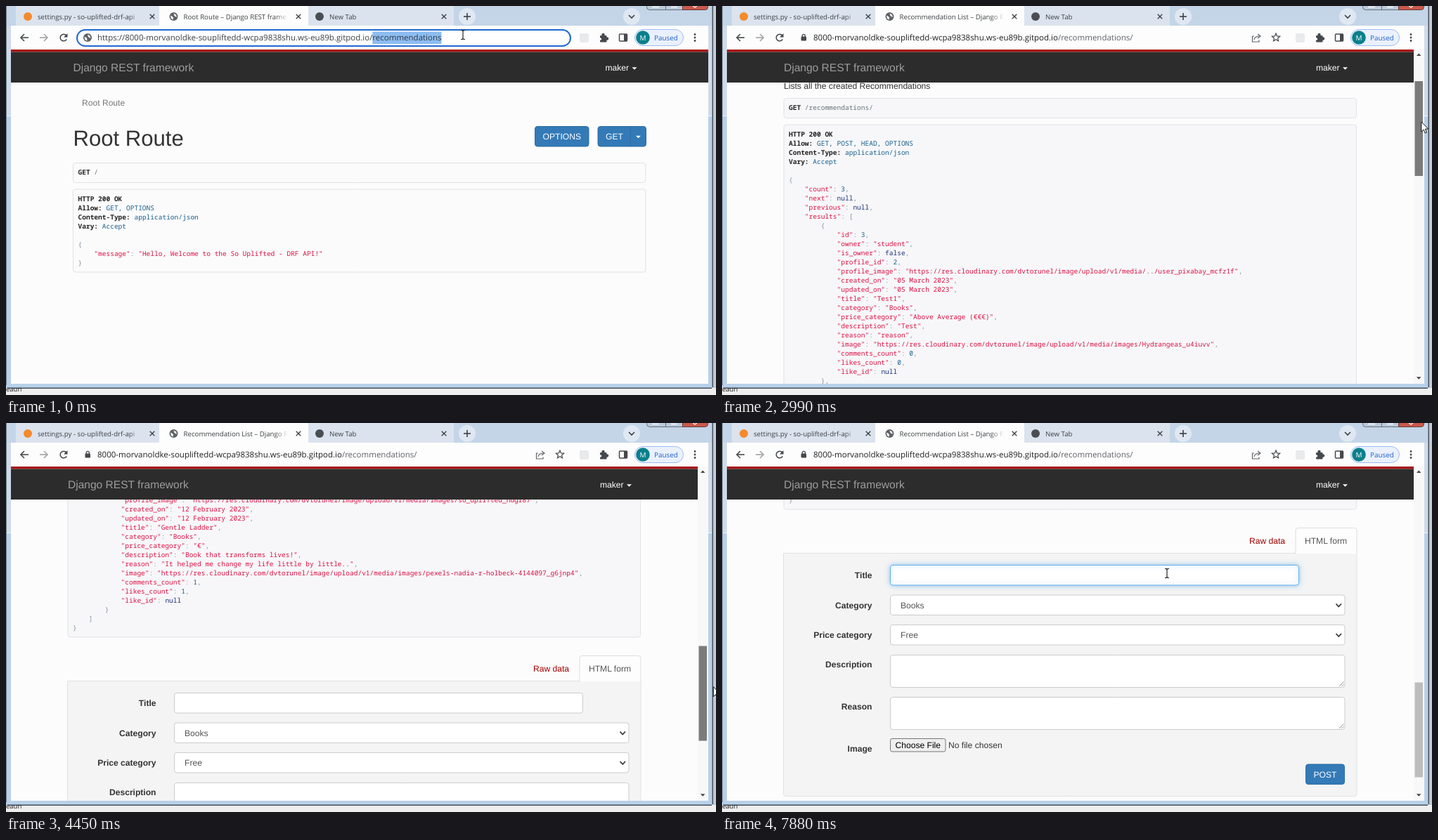
Write an HTML page with a canvas that moves like this. It is 1010 by 554 pixels and loops after 8 s.

```html
<!DOCTYPE html>
<html lang="en">
<head>
<meta charset="utf-8">
<title>Recommendation List</title>
<style>
html, body { margin: 0; width: 100%; height: 100%; overflow: hidden; background: #eee; }
canvas { display: block; width: 1010px; height: 554px; }
</style>
</head>
<body>
<canvas id="stage" width="1010" height="554"></canvas>
<script>
const c = document.getElementById('stage').getContext('2d');
const LOOP = 8000;
const SANS = '"Liberation Sans", Arial, sans-serif';
const UI = '"Open Sans", "Noto Sans", sans-serif';
const MONO = '"Noto Sans Mono", "DejaVu Sans Mono", monospace';
const BODY = '12.1px ' + SANS;
const BOLD = 'bold ' + BODY;
const CELL = 5.712, LINE = 13;
const END_SCROLL = 1027;

// Each move: start, end, number of steps, then the values reached
const MOUSE = [
  [0, 0, 1, 650, 41],
  [1520, 1690, 4, 917, 211],
  [1940, 2580, 12, 992, 133],
  [2760, 3200, 7, 997, 189],
  [3430, 3710, 5, 1003, 252],
  [3990, 4260, 5, 1006, 367],
  [4450, 4920, 7, 1008, 428],
  [5330, 5440, 3, 724, 279],
  [5690, 5910, 5, 633, 214],
];
const SCROLL = [
  [0, 0, 1, 0],
  [2760, 3200, 7, 190],
  [3430, 3710, 5, 410],
  [3990, 4260, 5, 815],
  [4450, 4920, 7, END_SCROLL],
];

function follow(track, t) {
  let v = track[0].slice(3);
  for (const [from, to, n, ...goal] of track) {
    if (t < from) break;
    const k = Math.min(n, 1 + Math.floor((t - from) / (to - from || 1) * (n - 1) + 1e-6));
    v = v.map((x, i) => x + (goal[i] - x) * k / n);
  }
  return v;
}

// Drawing helpers
function rect(x, y, w, h, fill) {
  c.fillStyle = fill;
  c.fillRect(x, y, w, h);
}

function box(x, y, w, h, r, fill, stroke, width = 1) {
  c.beginPath();
  c.roundRect(x, y, w, h, r);
  if (fill) { c.fillStyle = fill; c.fill(); }
  if (stroke) { c.strokeStyle = stroke; c.lineWidth = width; c.stroke(); }
}

function disc(x, y, r, fill) {
  c.beginPath();
  c.arc(x, y, r, 0, 7);
  c.fillStyle = fill;
  c.fill();
}

function text(str, x, y, font, fill, align = 'left') {
  c.font = font;
  c.fillStyle = fill;
  c.textAlign = align;
  c.fillText(str, x, y);
}

function line(color, width, ...pts) {
  c.beginPath();
  for (let i = 0; i < pts.length; i += 2) c.lineTo(pts[i], pts[i + 1]);
  c.strokeStyle = color;
  c.lineWidth = width;
  c.stroke();
}

function shape(fill, ...pts) {
  c.beginPath();
  for (let i = 0; i < pts.length; i += 2) c.lineTo(pts[i], pts[i + 1]);
  c.closePath();
  c.fillStyle = fill;
  c.fill();
}

const caretDown = (x, y, fill, r = 3.5) => shape(fill, x - r, y - r / 2, x + r, y - r / 2, x, y + r / 2);

// Response text
const MEDIA = 'https://res.cloudinary.com/dvtorunel/image/upload/v1/media/';

function record(id, owner, mine, profile, photo, date, title, category, price, about, reason, image, count) {
  const day = date + ' 2023';
  return {
    id, owner, is_owner: mine, profile_id: profile, profile_image: MEDIA + photo,
    created_on: day, updated_on: day, title, category, price_category: price,
    description: about, reason, image: MEDIA + 'images/' + image,
    comments_count: count, likes_count: count, like_id: null,
  };
}

const USER_PHOTO = '../user_pixabay_mcfz1f';
const LIST = {
  count: 3, next: null, previous: null,
  results: [
    record(3, 'student', false, 2, USER_PHOTO, '05 March', 'Test1', 'Books',
      'Above Average (€€€)', 'Test', 'reason', 'Hydrangeas_u4iuvv', 0),
    record(2, 'student', false, 2, USER_PHOTO, '13 February', 'A quiet harbor', 'Music',
      'Free', 'Song that lifts the mood', 'It keeps me going', 'Tulips_k2dmwq', 1),
    record(1, 'maker', true, 1, 'images/so_uplifted_hdgr87', '12 February', 'Gentle Ladder', 'Books',
      '€', 'Book that transforms lives!', 'It helped me change my life little by little..',
      'pexels-nadia-r-holbeck-4144097_g6jnp4', 1),
  ],
};
const ROOT = { message: 'Hello, Welcome to the So Uplifted - DRF API!' };
const toLines = data => JSON.stringify(data, null, 4).split('\n');
const LIST_LINES = toLines(LIST), ROOT_LINES = toLines(ROOT);

const code = (str, x, y, fill, weight = '') => text(str, x, y, weight + '9.52px ' + MONO, fill);

function jsonLine(str, x, y) {
  for (const m of str.matchAll(/"[^"]*"|\w+|[^\w"\s]+/g)) {
    const s = m[0];
    const fill = s[0] === '"' ? '#dd1144' : /^\d/.test(s) ? '#195f91' : /\w/.test(s) ? '#1e347b' : '#8697a0';
    code(s, x + m.index * CELL, y, fill);
  }
}

function response(x, y, allow, lines, fill) {
  box(x + .5, y + .5, 814.5, lines.length * LINE + 79, 3.5, fill, '#e1e1e8');
  const left = x + 7.5;
  let row = y + 17;
  code('HTTP 200 OK', left, row, '#222', 'bold ');
  const head = [['Allow:', allow], ['Content-Type:', 'application/json'], ['Vary:', 'Accept']];
  for (const [key, value] of head) {
    row += LINE;
    code(key, left, row, '#222', 'bold ');
    code(value, left + (key.length + 1) * CELL, row, '#195f91');
  }
  row += 2 * LINE;
  lines.forEach((s, i) => {
    const ly = row + i * LINE;
    if (ly > -500) jsonLine(s, left, ly);
  });
}

function request(x, y, path, fill) {
  box(x + .5, y + .5, 814.5, 28, 3.5, fill, '#e1e1e8');
  code('GET', x + 7.5, y + 17, '#222', 'bold ');
  code(path, x + 7.5 + 4 * CELL, y + 17, '#66737a');
}

function button(label, x, y, w, split) {
  box(x + .5, y + .5, w - 1, 28.5, 3.5, '#337ab7', '#2e6da4');
  text(label, split ? x + 24 : x + w / 2, y + 19, BODY, '#fff', 'center');
  if (split) {
    line('#2e6da4', 1, x + 46.5, y, x + 46.5, y + 29);
    caretDown(x + 58, y + 15.5, '#fff');
  }
}

function wrench(x, y) {
  line('#333', 2.6, x - 5, y + 5, x + 2, y - 2);
  c.beginPath();
  c.arc(x + 2.8, y - 2.8, 2.5, -.3, 5);
  c.strokeStyle = '#333';
  c.lineWidth = 2;
  c.stroke();
}

// Pages
function rootPage() {
  const x = 95.5;
  text('Root Route', 108, 142.3, BODY, '#777');
  text('Root Route', x, 198.5, '31.1px ' + SANS, '#333');
  button('OPTIONS', 752, 171, 77.5);
  button('GET', 841.5, 171, 69.5, true);
  request(x - .5, 223, '/', '#fbfbfb');
  response(x - .5, 260.5, 'GET, OPTIONS', ROOT_LINES, '#fbfbfb');
}

function listPage(scroll, t) {
  const pre = scroll ? '#f7f7f9' : '#fafafa';
  c.save();
  c.translate(0, -Math.round(scroll));
  text('Root Route', 100.5, 142.3, BODY, '#a30000');
  text('/', 170, 142.3, BODY, '#ccc');
  text('Recommendation List', 181, 142.3, BODY, '#777');
  text('Recommendation List', 88, 198.5, '31.1px ' + SANS, '#333');
  text('Lists all the created Recommendations', 88, 227.3, BODY, '#333');
  box(665.5, 171.5, 70, 28.5, 3.5, '#fff', '#ccc');
  wrench(682, 185);
  text('Filters', 691.5, 190, BODY, '#333');
  button('OPTIONS', 744, 171, 77.5);
  button('GET', 834, 171, 69.5, true);
  request(87.5, 240, '/recommendations/', pre);
  response(87.5, 277.5, 'GET, POST, HEAD, OPTIONS', LIST_LINES, pre);
  c.translate(0, END_SCROLL);
  form(t);
  c.restore();
}

function label(str, y) {
  text(str, 213.5, y + 4.3, BOLD, '#333', 'right');
}

function field(y, w, h) {
  box(239.5, y + .5, w, h, 3.5, '#fff', '#ccc');
}

function select(name, value, y) {
  label(name, y);
  field(y - 15, 646.5, 28.5);
  text(value, 254, y + 4.3, BODY, '#555');
  line('#333', 1.7, 873.5, y - 2, 877.2, y + 2, 881, y - 2);
}

function area(name, y) {
  label(name, y + 14);
  field(y, 646.5, 46);
  line('#777', .8, 878, y + 45, 884.5, y + 38.5);
  line('#777', .8, 881.5, y + 45, 884.5, y + 42);
}

function form(t) {
  box(87.5, 185.5, 815.5, 346, [0, 0, 3.5, 3.5], '#f4f4f4', '#e1e1e1');
  c.beginPath();
  c.moveTo(816, 186);
  c.arcTo(816, 149.5, 830, 149.5, 3.5);
  c.arcTo(903, 149.5, 903, 186, 3.5);
  c.lineTo(903, 186);
  c.fillStyle = '#fdfdfd';
  c.fill();
  c.strokeStyle = '#ddd';
  c.lineWidth = 1;
  c.stroke();
  text('Raw data', 750, 171.5, BODY, '#a30000');
  text('HTML form', 829, 171.5, BODY, '#555');

  label('Title', 217);
  const focus = t < 6350 ? 0 : t < 6400 ? .5 : 1;
  c.save();
  if (focus) {
    c.shadowColor = `rgba(102,175,233,${.7 * focus})`;
    c.shadowBlur = 7;
  }
  box(239.5, 202.5, 581, 28.5, 3.5, '#fff', focus ? '#66afe9' : '#ccc');
  c.restore();
  if ((t >= 6350 && t < 6840) || (t >= 7410 && t < 7880)) rect(251, 210, 1, 14, '#333');

  select('Category', 'Books', 259.5);
  select('Price category', 'Free', 302);
  area('Description', 330);
  area('Reason', 390);
  label('Image', 464);
  box(239.5, 449.5, 78.5, 18.5, 2.5, '#efefef', '#767676');
  text('Choose File', 246.5, 463, BODY, '#000');
  text('No file chosen', 322, 463, BODY, '#333');
  button('POST', 830, 485.5, 56);
}

function scrollbar(scroll, t) {
  rect(984, 62, 15, 476, '#f8f8f8');
  const y = 76 + scroll * 293.5 / END_SCROLL;
  const held = t >= 2400 && t < 5110;
  rect(985.5, y, 11.5, 135, held ? '#7b7b7b' : '#bdbdbd');
  shape(scroll ? '#444' : '#a3a3a3', 988, 71, 994.5, 71, 991.2, 67.5);
  caretDown(991.2, 530, '#444', 3.3);
}

// Browser window
function frameGlass() {
  rect(0, 0, 1010, 554, '#eeeeee');
  rect(1004, 0, 6, 544, '#c3c9d0');
  rect(0, 0, 1005, 157, '#cfdbe8');
  rect(0, 157, 1005, 387, '#b8d0e9');
  rect(0, 156, 7, 1, '#eef5fb');
  rect(999, 156, 6, 1, '#eef5fb');
  rect(0, 0, 1, 540, '#71808f');
  rect(1004.5, 0, 1.5, 543, '#45515e');
  rect(2, 543.5, 1002, 1.5, '#45515e');
  text('eaun', 0, 549, '9.5px ' + UI, '#222');
  rect(1, 0, 1003, 28, '#c4d5e8');
}

function globe(x, y) {
  disc(x, y, 6, '#5f6368');
  shape('#fff', x - 4.5, y - 1.5, x - 1, y + .5, x - .5, y + 4.5, x - 3.5, y + 3);
  shape('#fff', x, y - 4.5, x + 3.5, y - 2.5, x + 4.3, y + 1, x + 1, y - 1);
}

function tab(title, x, end) {
  const fade = c.createLinearGradient(end - 18, 0, end, 0);
  fade.addColorStop(0, '#3c4043');
  fade.addColorStop(1, 'rgba(60,64,67,0)');
  text(title, x, 18.5, '9.7px ' + UI, fade);
  const mx = end + 15;
  line('#3c4043', 1.3, mx - 3.3, 11.7, mx + 3.3, 18.3);
  line('#3c4043', 1.3, mx - 3.3, 18.3, mx + 3.3, 11.7);
}

function tabStrip(title) {
  box(14, -6, 204, 34, 0, '#dbe3ee');
  box(430, -6, 207, 34, 0, '#dbe3ee');
  box(218, -6, 212, 36, [6, 6, 0, 0], '#fdfdfd');
  disc(31, 15, 6, '#f58a2c');
  tab('settings.py - so-uplifted-drf-api', 45, 193);
  globe(238.5, 15);
  tab(title, 252.5, 401);
  disc(446, 15, 6, '#4a4e52');
  tab('New Tab', 460, 608);
  disc(656, 15, 12, '#dfe8f2');
  line('#3c4043', 1.6, 651, 15, 661, 15);
  line('#3c4043', 1.6, 656, 10, 656, 20);
  disc(890, 15, 12, '#dfe8f2');
  line('#3c4043', 1.6, 886, 13, 890, 17, 894, 13);
  box(911.5, -5, 54, 10.5, [0, 0, 0, 4], '#bccada', '#66727f');
  line('#66727f', 1, 938.5, 0, 938.5, 5);
  box(962.5, -5, 36, 10.5, [0, 0, 4, 0], '#c9584a', '#6c3a38');
  line('#fff', 1.3, 919, 1.5, 929, 1.5);
  line('#fff', 1.3, 946, 1.5, 955, 1.5);
  line('#fff', 1.3, 977, 0, 980, 2, 983, 0);
}

function toolbar(editing) {
  rect(7, 28, 992, 34, '#fdfdfd');
  const ink = '#45494d';
  line(ink, 1.6, 32, 45, 21, 45);
  line(ink, 1.6, 26, 40, 21, 45, 26, 50);
  line('#a0a4a8', 1.6, 48, 45, 59, 45);
  line('#a0a4a8', 1.6, 54, 40, 59, 45, 54, 50);
  c.beginPath();
  c.arc(82, 45, 4.8, .5, 5.6);
  c.strokeStyle = ink;
  c.lineWidth = 1.6;
  c.stroke();
  shape(ink, 87.5, 39, 87.5, 44.5, 82, 44.5);

  const font = '11.5px ' + UI;
  const host = '8000-morvanoldke-souplifteddd-wcpa9838shu.ws-eu89b.gitpod.io'.replace('dddd', 'ddd').replace('ddd-', 'dd-');
  c.font = font;
  if (editing) {
    box(101, 34, 702, 23, 11.5, '#fff', '#1f69cf', 2);
    globe(116, 45);
    const start = 'https://' + host + '/';
    const x = 130 + c.measureText(start).width;
    c.font = font;
    const w = c.measureText('recommendations').width;
    rect(x, 36.5, w, 17.5, '#8dbcf0');
    text(start, 130, 49, font, '#3c4043');
    text('recommendations', x, 49, font, '#2d3a4a');
  } else {
    box(112.5, 43.5, 7.5, 6, 1, ink);
    box(114.2, 40.3, 4.1, 6, 2, null, ink, 1.3);
    const w = c.measureText(host).width;
    text(host, 130, 49, font, '#202124');
    text('/recommendations/', 130 + w, 49, font, '#5f6368');
    line('#5f6368', 1.2, 757, 43, 754.5, 43, 754.5, 51, 764, 51, 764, 48.5);
    c.beginPath();
    c.moveTo(757, 48);
    c.quadraticCurveTo(758, 43, 765, 43);
    c.stroke();
    line('#5f6368', 1.2, 762, 40, 766, 43, 762, 46);
    star(788, 45);
  }

  box(816, 39, 13, 13, 2, '#e8eaec');
  box(845, 42, 9.5, 9.5, 1, ink);
  disc(849.5, 41, 2.2, ink);
  disc(855, 46.5, 2.2, ink);
  disc(845.5, 47, 1.7, '#fdfdfd');
  box(872.5, 40, 11, 10, 1, null, ink, 1.5);
  rect(879, 40, 5, 10, ink);
  box(894.5, 33.5, 69, 23, 11.5, '#eaf1fd', '#9dbcf0');
  disc(906, 45, 9.8, '#08808c');
  text('M', 906, 48.7, '10px ' + UI, '#fff', 'center');
  text('Paused', 922, 48.6, '9.9px ' + UI, '#2160c4');
  for (const y of [40.5, 45, 49.5]) disc(980, y, 1.4, ink);
}

function star(x, y) {
  c.beginPath();
  for (let i = 0; i < 10; i++) {
    const a = i * Math.PI / 5 - Math.PI / 2, r = i % 2 ? 2.7 : 6;
    c.lineTo(x + r * Math.cos(a), y + r * Math.sin(a));
  }
  c.closePath();
  c.strokeStyle = '#45494d';
  c.lineWidth = 1.2;
  c.stroke();
}

function navbar(x, right) {
  rect(7, 62, right - 7, 3.5, '#a80b0f');
  rect(7, 65.5, right - 7, 43.5, '#2c2c2c');
  text('Django REST framework', x, 93, '15.55px ' + SANS, '#9d9d9d');
  text('maker', x + 757, 92, BODY, '#fff');
  caretDown(x + 798.5, 89, '#fff');
}

function pointer(x, y, beam) {
  if (beam) {
    line('#222', 1.2, x - 3, y - 6.5, x - 1, y - 6.5, x, y - 5.5, x + 1, y - 6.5, x + 3, y - 6.5);
    line('#222', 1.2, x, y - 6, x, y + 6);
    line('#222', 1.2, x - 3, y + 6.5, x - 1, y + 6.5, x, y + 5.5, x + 1, y + 6.5, x + 3, y + 6.5);
    return;
  }
  c.save();
  c.translate(x, y);
  shape('#fff', 0, 0, 0, 14, 3.2, 11, 5.4, 16, 7.6, 15, 5.5, 10.2, 9.8, 10);
  c.strokeStyle = '#111';
  c.lineWidth = 1;
  c.stroke();
  c.restore();
}

function draw(t) {
  const [scroll] = follow(SCROLL, t);
  const [mx, my] = follow(MOUSE, t);
  const loaded = t >= 450;
  const right = loaded ? 984 : 999;

  c.textRendering = 'geometricPrecision';
  frameGlass();
  tabStrip((loaded ? 'Recommendation List' : 'Root Route') + ' – Django REST framework');
  toolbar(t < 310);

  rect(7, 62, 992, 476, '#fcfcfc');
  if (loaded && !scroll) rect(75, 109, 909, 429, '#fafafa');
  c.save();
  c.beginPath();
  c.rect(7, 109, right - 7, 429);
  c.clip();
  if (loaded) listPage(scroll, t);
  else rootPage();
  c.restore();

  if (loaded) scrollbar(scroll, t);
  navbar(loaded ? 88 : 95.5, right);
  pointer(mx, my, t < 1520 || t >= 5910);
}

function tick(now) {
  draw(now % LOOP);
  requestAnimationFrame(tick);
}
draw(0);
requestAnimationFrame(tick);
</script>
</body>
</html>
```
